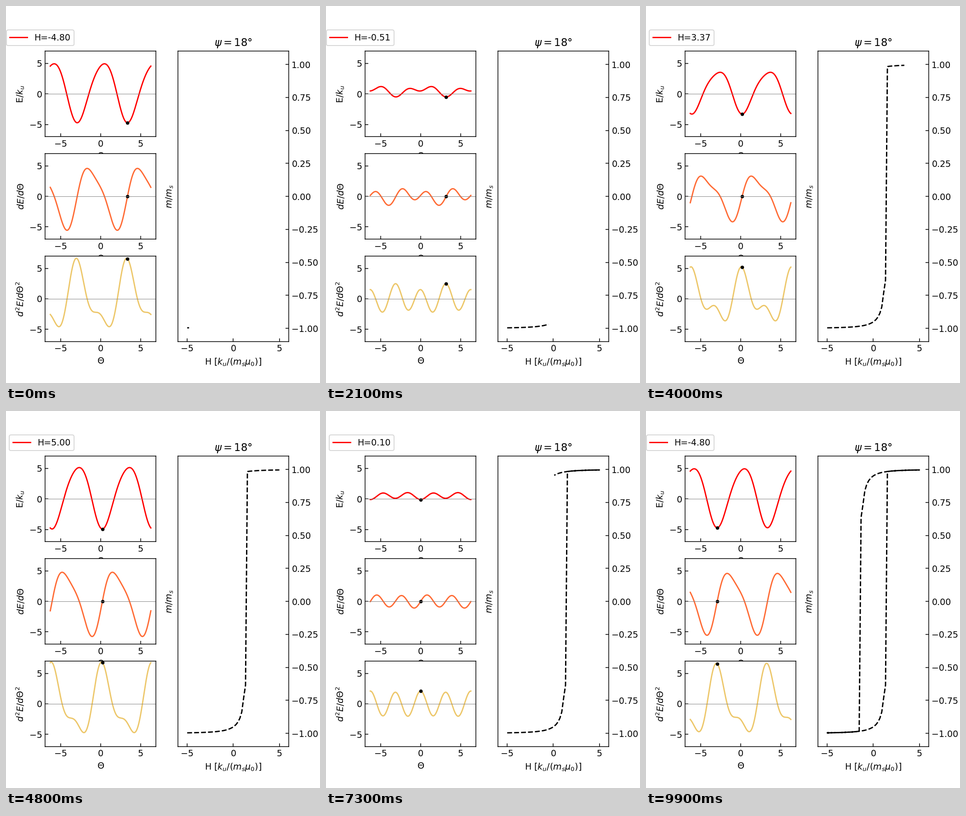
These frames come from a looping animation (683 px wide and 820 px high, 10 s). A matplotlib script:

```python
import numpy as np
import matplotlib.pyplot as plt
from matplotlib.animation import FuncAnimation

WIDTH, HEIGHT = 683, 820
DPI = HEIGHT / 6
PSI = np.radians(18)
FRAMES, INTERVAL = 100, 100


def energy(theta, h):
    return np.sin(theta) ** 2 - h * np.cos(theta - PSI)


def slope(theta, h):
    return np.sin(2 * theta) + h * np.sin(theta - PSI)


def curvature(theta, h):
    return 2 * np.cos(2 * theta) + h * np.cos(theta - PSI)


def rising_angle(h):
    """Angle of the magnetisation while the field rises; it flips past h = 1.4."""
    low, high = (np.pi - 0.6, np.pi + PSI) if h < 1.4 else (0, PSI)
    theta = np.linspace(low, high, 4001)
    return theta[np.argmin(np.abs(slope(theta, h)))]


# Field sweep up, back down, and one step into the next rise.
sweep = np.linspace(-5, 5, 50)
fields = np.concatenate([sweep, sweep[::-1], sweep[1:2]])
angles = np.array([rising_angle(h) if i < 50 else rising_angle(-h) - np.pi
                   for i, h in enumerate(fields)])
moments = np.cos(angles - PSI)

# The small margin keeps the pixel size from rounding down.
fig = plt.figure(figsize=((WIDTH + 1e-6) / DPI, (HEIGHT + 1e-6) / DPI), dpi=DPI)
fig.patch.set_facecolor("white")
grid = fig.add_gridspec(3, 2)

x = np.linspace(-2 * np.pi, 2 * np.pi, 400)
panels = [
    (energy, "red", "E/$k_u$"),
    (slope, "#ff6b35", r"$dE/d\Theta$"),
    (curvature, "#edc76a", r"$d^2E/d\Theta^2$"),
]
curves, dots = [], []
for row, (func, color, label) in enumerate(panels):
    ax = fig.add_subplot(grid[row, 0])
    curves += ax.plot(x, func(x, fields[1]), color=color, lw=1.5, label="H=0.00")
    dots += ax.plot([], [], "ko", ms=3)
    ax.axhline(0, color="gray", lw=0.5, zorder=2)
    ax.set(xlim=(-2.2 * np.pi, 2.2 * np.pi), ylim=(-7, 7),
           xticks=[-5, 0, 5], yticks=[-5, 0, 5],
           xlabel=r"$\Theta$", ylabel=label)
    ax.tick_params(direction="in")
    if row == 0:
        legend = ax.legend(handles=curves[:1], loc="upper right",
                           bbox_to_anchor=(0.3, 1.3))
field_text = legend.get_texts()[0]

loop_ax = fig.add_subplot(grid[:, 1])
loop_line, = loop_ax.plot([], [], "k--", lw=1.5)
loop_ax.yaxis.tick_right()
loop_ax.yaxis.set_label_position("left")
loop_ax.tick_params(direction="in")
loop_ax.set(xlim=(-6, 6), ylim=(-1.1, 1.1),
            xticks=[-5, 0, 5], yticks=np.linspace(-1, 1, 9),
            xlabel=r"H [$k_u/(m_s\mu_0)$]", ylabel="$m/m_s$",
            title=r"$\psi=18°$")


def update(frame):
    i = frame + 1
    h, theta = fields[i], angles[i]
    for (func, _, _), curve, dot in zip(panels, curves, dots):
        curve.set_ydata(func(x, h))
        dot.set_data([theta], [func(theta, h)])
    field_text.set_text(f"H={h:.2f}")
    loop_line.set_data(fields[:i + 1], moments[:i + 1])
    return [*curves, *dots, loop_line, field_text]


anim = FuncAnimation(fig, update, frames=FRAMES, interval=INTERVAL,
                     repeat=True, repeat_delay=0, blit=False)
plt.show()
```
